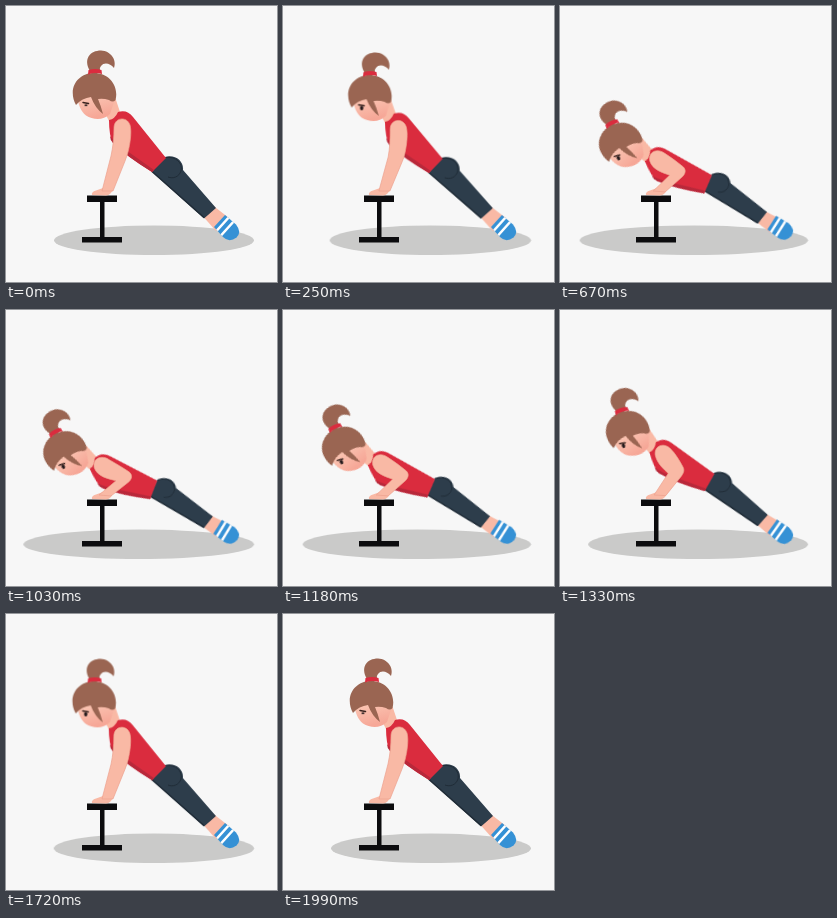
Animation, 271 px wide and 276 px high, one loop 2.02 s. Source, as an HTML page without scripts:

```html
<!DOCTYPE html>
<html lang="en">
<head>
<meta charset="utf-8">
<title>Incline push-up</title>
<style>
  html, body { margin: 0; width: 100%; height: 100%; overflow: hidden; background: #f7f7f7; }
  svg { display: block; width: 100%; height: 100%; }

  .move, .arm { animation: press 2.02s cubic-bezier(.7, 0, .3, 1) infinite; }
  .shadow { transform-origin: 248px 234px; --low: scaleX(1.155); }
  .foot { transform-origin: 222px 226px; --low: rotate(-11deg); }
  .leg { transform-origin: 222px 226px; --low: rotate(-11.5deg) scale(.92); }
  .torso { transform-origin: 153px 160px; --low: translate(-5px, 21px) rotate(-24deg); }
  .head { transform-origin: 104px 106px; --low: rotate(-4deg); }
  .arm { animation-name: bend; }
  .eye { transform-origin: 80px 99px; animation: blink 2.02s step-end infinite; }

  @keyframes press {
    0%, 3.47%, 89.6%, 100% { transform: none; }
    45.05%, 46.04% { transform: var(--low); }
  }
  /* Both poses share one command sequence so the outline can morph. */
  @keyframes bend {
    0%, 3.47%, 89.6%, 100% {
      d: path("M108 122C108 111 121 110 124 119C126 126 124 138 122 146C121 150 120 152 119 155L107 185L96 185L105 150C107 141 108 131 108 122Z");
    }
    45.05%, 46.04% {
      d: path("M88 158C86 148 96 145 103 150C110 154 117 158 123 162C127 165 126 169 123 172L105 186L93 185L110 171C102 169 91 167 88 158Z");
    }
  }
  @keyframes blink {
    0% { transform: scaleY(.4); }
    5% { transform: none; }
    97.03% { transform: scaleY(.6); }
    98.51% { transform: scaleY(.4); }
  }

  .skin { fill: #f9b9a5; }
  .hair { fill: #9a6552; }
  .red { fill: #da2c3e; }
  .pants { fill: #2d3d4b; }
</style>
</head>
<body>
<svg viewBox="0 0 271 276" preserveAspectRatio="none">
  <defs>
    <linearGradient id="blush" x1="0" y1="0" x2=".3" y2="1">
      <stop offset=".4" stop-color="#fac3b1"/>
      <stop offset="1" stop-color="#f6a797"/>
    </linearGradient>
    <path id="shoe" d="M208 221L219 209L230 218.500Q236 226 230.500 231.500Q223 237 217 231Z"/>
    <clipPath id="sock"><use href="#shoe"/></clipPath>
  </defs>

  <ellipse class="move shadow" cx="148" cy="234.3" rx="100" ry="14.8" fill="#cacac9"/>

  <path d="M81 189.5h30v6.5h-30zM94 195h4.5v37h-4.5zM76 231h40v5.5h-40z" fill="#0c0c0e"/>

  <g class="move leg">
    <path class="skin" d="M194 207L205 198L223 212L210 225Z"/>
    <path class="pants" d="M145 165L159 151C169 148 178 155 177 164L210 202L198 212.500Z"/>
    <path d="M146 165.500L198 211.500" stroke="#1f2b36" stroke-width="1.500"/>
    <path d="M159 151.500C170 150 177 157 175 165C173 171 167 173 162 171" fill="none" stroke="#202c37"/>
  </g>

  <g class="move foot">
    <use href="#shoe" fill="#3591d5"/>
    <path d="M210 225.500L224 210M214.500 230L229 214" clip-path="url(#sock)" stroke="#fff" stroke-width="2.600"/>
  </g>

  <g class="move torso">
    <path class="skin" d="M97 103L109 91L114 106Q113 114 103 115Z"/>
    <path class="red" d="M103 114Q109 113 112 106Q121 103 127 111L160 152L146 166Q120 150 107 137Q103 130 103 114Z"/>
    <path d="M104 130Q108 135 117 142L148 164L146 166Q120 150 107 137Q104 134 104 130Z" fill="#b8283a"/>
    <g class="move head">
      <path d="M71 90C72 98 75 106 80 109.500C87 114 97 115 104 108L109 93L92 80Z" fill="url(#blush)"/>
      <g class="hair">
        <path d="M84 65C77 53 84 44.500 95 44.500C105 45 111 54 108 62C104 57 98 56 95 60Q93 62 94 65Z"/>
        <path d="M70 99C61 82 72 67 88 67C104 67 113 81 109.500 94Q107 97 103 94Q97 92 92 93Q95 100 97 108Q89 102 85 91Q76 92 70 99Z"/>
      </g>
      <path class="red" d="M82.500 64Q89 62 95.500 64L96 68Q89 66 82 68.500Z"/>
      <path d="M77 96.500L82.500 97.500" stroke="#3a2420" stroke-width="1.500" stroke-linecap="round"/>
      <ellipse class="eye" cx="80" cy="99.800" rx="1.700" ry="2.200" fill="#241a1c"/>
    </g>
  </g>

  <path class="skin" d="M86 189Q85 186 90 184.500L97 182L107 183Q105 189 100 189.500Z"/>
  <path class="arm skin" stroke="#eda18e" stroke-width=".7"/>
</svg>
</body>
</html>
```
